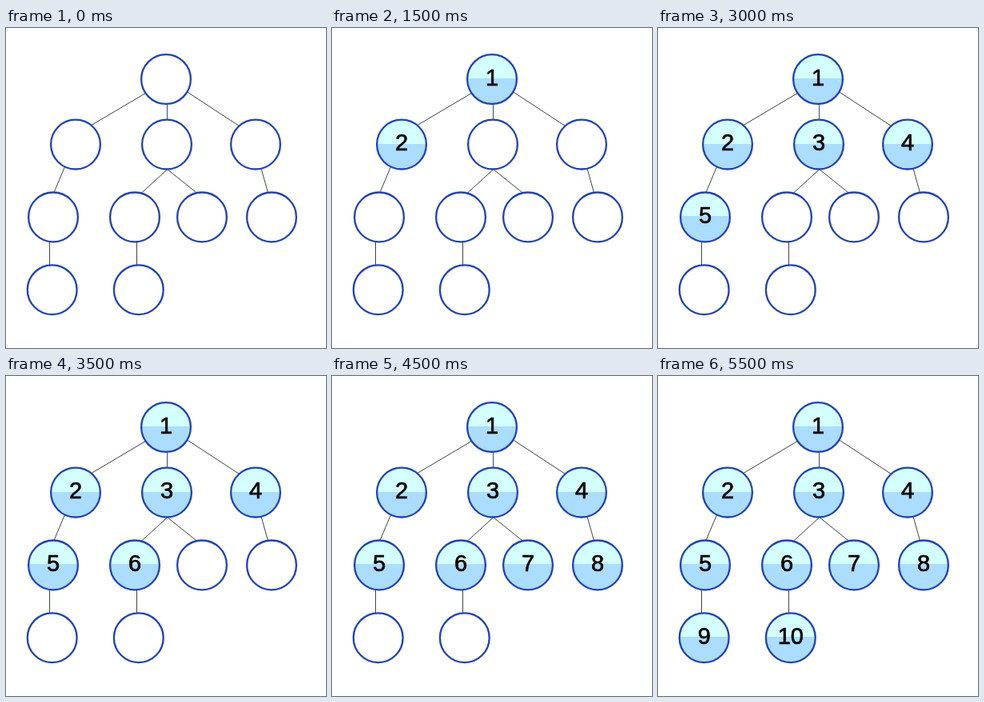
Write an HTML page with a canvas that moves like this. It is 400 px wide and 400 px high and loops after 7.5 s.

```html
<!DOCTYPE html>
<html lang="en">
<head>
<meta charset="utf-8">
<title>Breadth-first order</title>
<style>
html, body { margin: 0; width: 100%; height: 100%; overflow: hidden; background: #fff; }
canvas { display: block; width: 400px; height: 400px; }
</style>
</head>
<body>
<canvas id="stage" width="400" height="400"></canvas>
<script>
const ctx = document.getElementById('stage').getContext('2d');
const LOOP = 7500, FIRST = 1000, STEP = 500;
const RADIUS = 30.9, TOP = 64, SECOND = 145.6, GAP = 90.8;
const BLUE = '#1f42bc', DARK = '#3c463c', SLATE = '#2f4a9c';

const rowY = row => row ? SECOND + (row - 1) * GAP : TOP;

// An edge leaves the parent at x = out and meets the child at x = into.
function node(x, row, parent, out, into, edge = DARK) {
  return { x, y: rowY(row), parent, out, into, edge };
}

// Built level by level, so the order is also the visiting order.
const root = node(200, 0);
const left = node(87, 1, root, 174.5, 106.5);
const middle = node(201, 1, root, 201.5, 201.5, SLATE);
const right = node(312, 1, root, 226.5, 291.5);
const outer = node(59, 2, left, 73.5, 60);
const inner = node(161, 2, middle, 202, 169);
const nodes = [
  root, left, middle, right, outer, inner,
  node(245, 2, middle, 201.5, 238.5),
  node(332, 2, right, 319, 327.5),
  node(57.7, 3, outer, 54.5, 54.5),
  node(165.8, 3, inner, 163.5, 163.5)
];

// Height of the circle's rim above or below its centre at a given x
const rim = (n, x) => Math.sqrt(RADIUS ** 2 - (x - n.x) ** 2);

function drawEdge(n) {
  const p = n.parent;
  if (!p) return;
  ctx.strokeStyle = n.edge;
  ctx.lineWidth = 1;
  ctx.beginPath();
  ctx.moveTo(n.out, p.y + rim(p, n.out));
  ctx.lineTo(n.into, n.y - rim(n, n.into));
  ctx.stroke();
}

function fillNode(n) {
  const split = Math.floor(n.y - 0.5);
  ctx.save();
  ctx.beginPath();
  ctx.arc(n.x, n.y, RADIUS, 0, Math.PI * 2);
  ctx.clip();
  ctx.fillStyle = '#d4ffff';
  ctx.fillRect(n.x - 32, split - 32, 64, 32);
  ctx.fillStyle = '#aaddff';
  ctx.fillRect(n.x - 32, split, 64, 33);
  ctx.restore();
}

function drawLabel(n, text) {
  const y = Math.floor(n.y + 8);
  ctx.fillStyle = ctx.strokeStyle = '#000';
  ctx.lineWidth = 0.7;
  ctx.fillText(text, n.x, y);
  ctx.strokeText(text, n.x, y);
}

function drawNode(n, number, visited) {
  if (visited) fillNode(n);
  ctx.strokeStyle = BLUE;
  ctx.lineWidth = 2.3;
  ctx.beginPath();
  ctx.arc(n.x, n.y, RADIUS, 0, Math.PI * 2);
  ctx.stroke();
  if (visited) drawLabel(n, number);
}

function draw(time) {
  const count = Math.floor((time - FIRST) / STEP) + 1;
  ctx.fillStyle = '#fff';
  ctx.fillRect(0, 0, 400, 400);
  ctx.font = '29px "Liberation Sans", Arial, sans-serif';
  ctx.textAlign = 'center';
  ctx.textBaseline = 'alphabetic';
  ctx.lineJoin = 'round';
  nodes.forEach(drawEdge);
  nodes.forEach((n, i) => drawNode(n, i + 1, i < count));
}

const start = performance.now();
function tick() {
  draw((performance.now() - start) % LOOP);
  requestAnimationFrame(tick);
}
tick();
</script>
</body>
</html>
```
